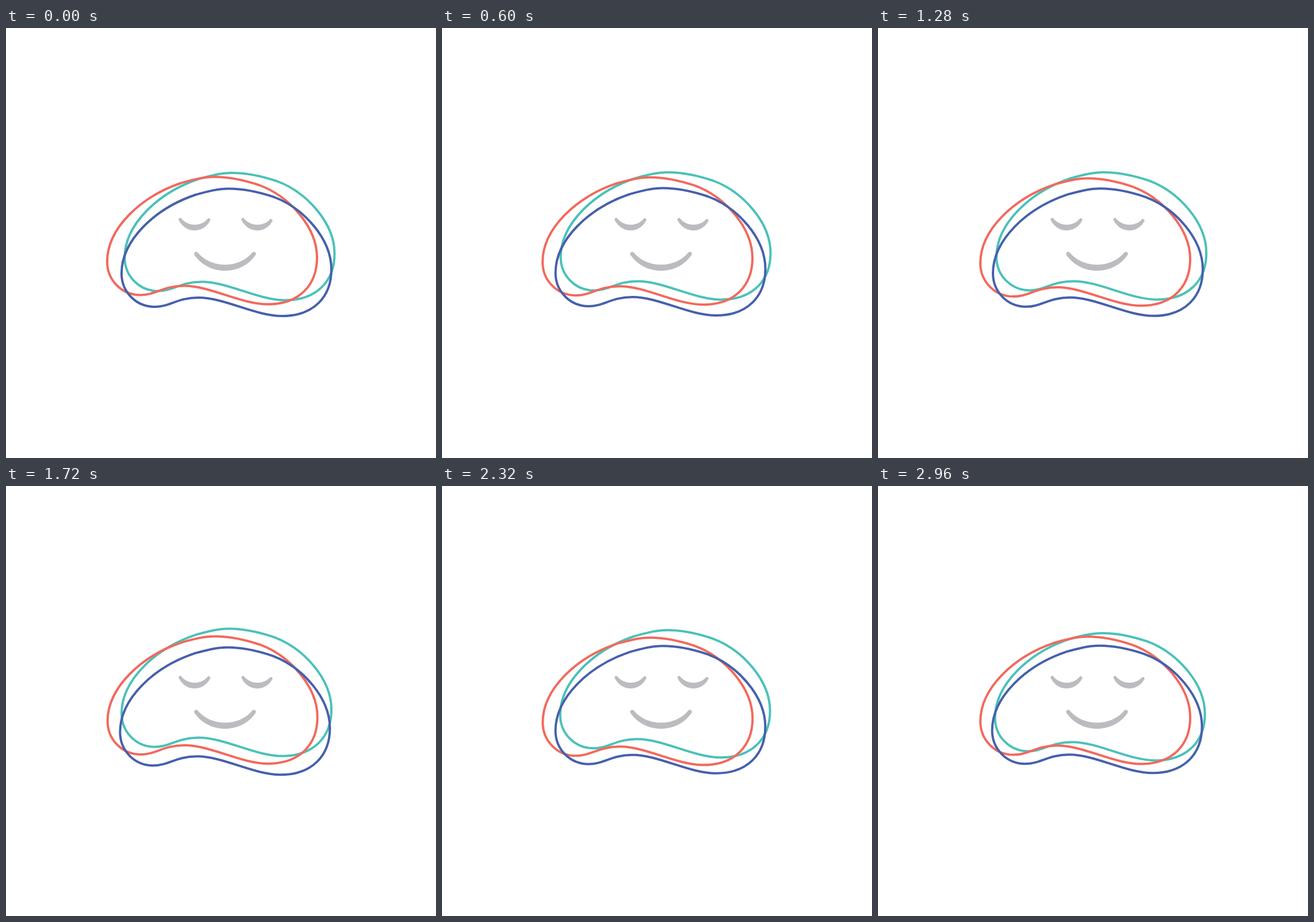
An HTML page that plays this animation: 748 px wide and 748 px high, repeating every 3 s.

```html
<!DOCTYPE html>
<html>
<head>
<meta charset="utf-8">
<style>
  html, body { margin: 0; width: 100%; height: 100%; overflow: hidden; background: #fff; }
  svg { display: block; width: 100%; height: 100%; }
  use { fill: none; stroke-width: 4; }
  #face { fill: #bbbcc0; }
</style>
</head>
<body>
<svg viewBox="0 0 748 748">
  <defs>
    <path id="bean" d="M388 279.5C414 279.5 442 286 466 294C517 313 566 366 566 420C566 467 536 501 480 501
      C434 501 380 469 335 469C298 469 285 485 259 485C226 485 201 459 201 427
      C201 369 259 314 330 290C350 284.5 368 279.5 388 279.5Z"/>
  </defs>
  <use id="teal" href="#bean" stroke="#4bc1b9"/>
  <use id="red" href="#bean" stroke="#f2695d"/>
  <use id="blue" href="#bean" stroke="#4660ac"/>
  <g id="face"><path id="left"/><path id="right"/><path id="mouth"/></g>
</svg>
<script>
const LOOP = 3000, STEP = 40, BEAT = 600, BLINK = 2040;
const el = id => document.getElementById(id);
const ease = u => u * u * (3 - 2 * u);

// Each outline wanders through one point per beat
const drift = {
  teal: [[5.5, -27.5], [5.5, -28.5], [5.7, -28.3], [-0.2, -31.3], [5, -28.2], [2.5, -23.4]],
  red: [[-25, -20.5], [-26, -19.8], [-23, -18], [-24.5, -17.9], [-25.7, -15.6], [-22.8, -17.5]],
  blue: [[0, 0], [-3.5, -1], [-1, -0.4], [-2.8, 1.3], [-3.6, -1.5], [-2.4, -1.7]]
};

// Catmull-Rom curve through evenly timed points
function wander(points, t) {
  const i = Math.floor(t / BEAT), u = t / BEAT - i, v = 1 - u;
  const at = n => points[Math.max(0, Math.min(n, points.length - 1))];
  return [0, 1].map(k => {
    const [p, a, b, q] = [i - 1, i, i + 1, i + 2].map(n => at(n)[k]);
    return a + (b - a) * ease(u) + u * v * ((b - p) * v - (q - a) * u) / 2;
  });
}

// Sagging stroke with round ends that swells in the middle; open = 0 leaves a hairline
function swell(x0, y0, x1, y1, depth, r, bulge, open = 1) {
  const inset = (x1 - x0) * 0.24, low = (y0 + y1) / 2 + depth;
  const bezier = (a, b, c, d, u, v) => a * v ** 3 + 3 * u * v * (b * v + c * u) + d * u ** 3;
  const slope = (a, b, c, d, u, v) => (b - a) * v * v + 2 * (c - b) * u * v + (d - c) * u * u;
  const xs = [x0, x0 + inset, x1 - inset, x1], ys = [y0, low, low, y1];
  const radius = u => 0.5 + (r + bulge * Math.sin(Math.PI * u) - 0.5) * open;
  const upper = [], lower = [];
  for (let i = 0; i <= 32; i++) {
    const u = i / 32, v = 1 - u;
    const x = bezier(...xs, u, v), y = bezier(...ys, u, v);
    const dx = slope(...xs, u, v), dy = slope(...ys, u, v);
    const s = radius(u) / Math.hypot(dx, dy);
    upper.push([x + dy * s, y - dx * s]);
    lower.unshift([x - dy * s, y + dx * s]);
  }
  const cap = `A${radius(0)} ${radius(0)} 0 0 1 `;
  return `M${upper.join("L")}${cap}${lower.join("L")}${cap}${upper[0]}Z`;
}

function draw(t) {
  for (const id in drift) el(id).setAttribute("transform", `translate(${wander(drift[id], t)})`);
  const open = ease(Math.min(1, Math.abs(t - BLINK) / 200));
  el("left").setAttribute("d", swell(303, 333, 352.7, 333.7, 18.4, 2.7, 2.3, open));
  el("right").setAttribute("d", swell(412.3, 333.2, 460.8, 335, 17.4, 2.7, 2.3, open));
}

el("mouth").setAttribute("d", swell(331, 393, 431, 393, 32, 3.6, 1.7));

function tick() {
  draw(Math.floor(performance.now() % LOOP / STEP) * STEP);
  requestAnimationFrame(tick);
}
tick();
</script>
</body>
</html>
```
